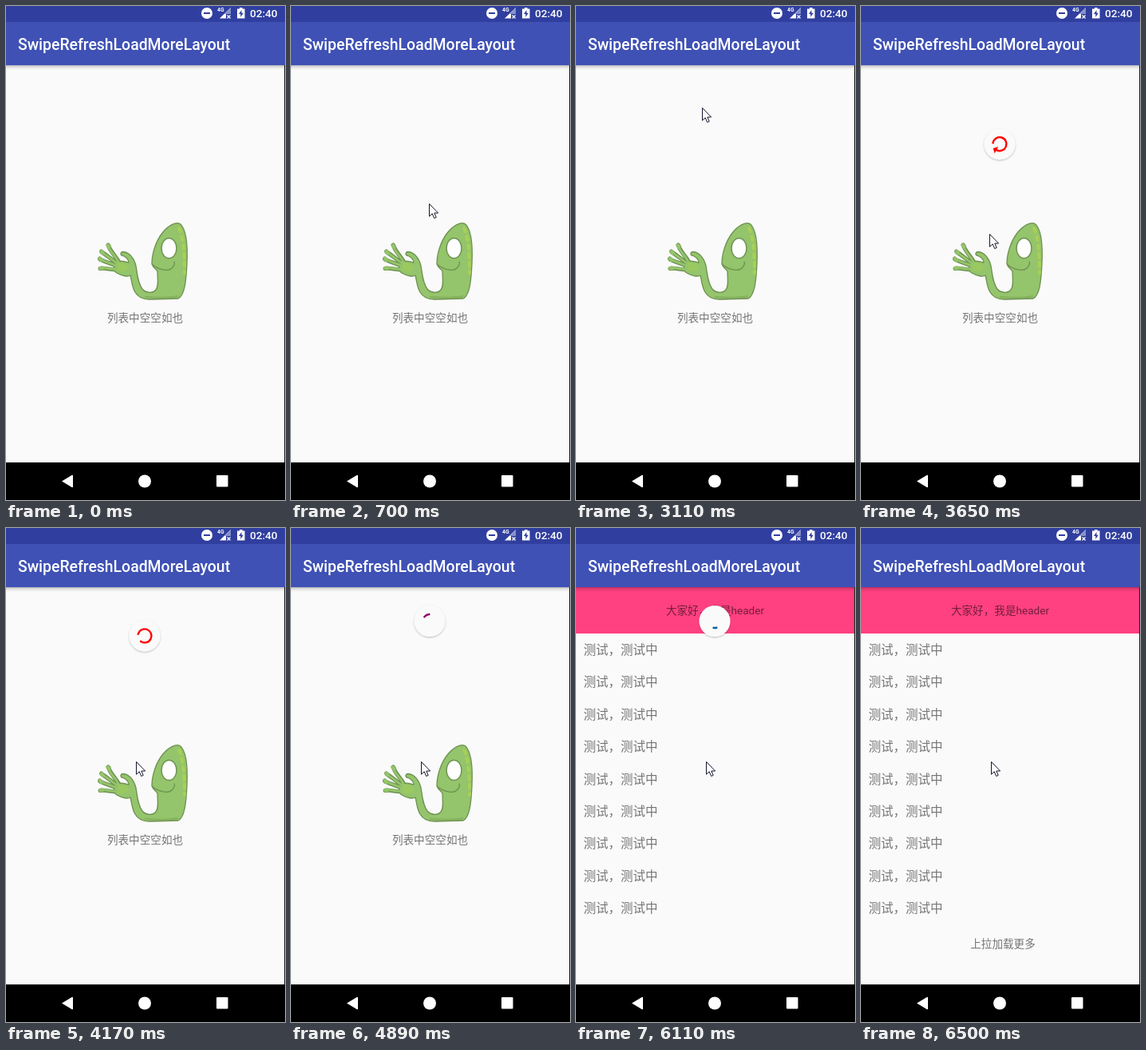
Recreate the animation shown at these times as an HTML page. Size 350 by 618 pixels, loop 8 s.

```html
<!DOCTYPE html>
<html lang="zh-CN">
<head>
<meta charset="utf-8">
<title>SwipeRefreshLoadMoreLayout</title>
<style>
  html, body { margin: 0; height: 100%; overflow: hidden; background: #fafafa; }
  svg { display: block; width: 350px; height: 618px; }
  text { font: 13.6px Roboto, 'Noto Sans CJK SC', 'Noto Sans CJK', sans-serif; fill: #757575; }
  .mid { text-anchor: middle; }
  .skin { fill: #94c46b; stroke: #6d9150; stroke-width: 1.3; stroke-linejoin: round; }
  .line { fill: none; stroke: #6d9150; stroke-width: 1.3; stroke-linecap: round; }
  .fingers { fill: none; stroke-linecap: round; }
</style>
</head>
<body>
<svg viewBox="0 0 350 618">
  <defs>
    <linearGradient id="fade" x2="0" y2="1">
      <stop stop-opacity=".28"/><stop offset=".4" stop-opacity=".1"/><stop offset="1" stop-opacity="0"/>
    </linearGradient>
    <filter id="soft" x="-30%" y="-30%" width="160%" height="160%">
      <feDropShadow dx="0" dy="1" stdDeviation="1.3" flood-opacity=".28"/>
    </filter>
    <g id="bones">
      <path d="M128.500 299.500C131 308 137 311 142 321M120.500 308C127 312 132 317 141 323M118 317C126 321 132 322 141 326M119 328C127 328 132 330 141 330"/>
      <path d="M128 299l1 1.500M119.500 307l1.500 1.500M117.500 316l1.500 1.500M118 328.500h2" stroke-width="5"/>
    </g>
  </defs>
  <rect width="350" height="618" fill="#fafafa"/>

  <g id="empty">
    <use href="#bones" class="fingers" stroke="#6d9150" stroke-width="5.200"/>
    <path class="skin" d="M216 366C224 362 226 345 227 322C228 300 226 280 219 273C213 269 203 275 196 284C188 294 183 310 183 322C184 328 188 328 190 332C190 342 192 350 188 355C184 360 175 359 171 354C165 346 165 336 163 325C161 316 155 308 147 307.500C143 308 143 312 147 312.500C151 314 154 318 154 321C150 320 144 318 139 320C135 324 134 331 139 334C146 338 153 339 156 337C158 345 158 352 162 358C166 365 172 367 180 367Z"/>
    <g transform="translate(130 318) scale(.955) translate(-130 -318)">
      <use href="#bones" class="fingers" stroke="#94c46b" stroke-width="3"/>
    </g>
    <path d="M141 321Q151 320 154 328Q148 334 140 331Z" fill="#9cc95f"/>
    <path class="line" d="M183 323C190 329 203 333 208 328C211 325 212 322 211 320"/>
    <ellipse cx="204.500" cy="303" rx="9.500" ry="12.500" fill="#fff" stroke="#6d9150" stroke-width="1.500"/>
    <path d="M217 278Q224 292 224 334" fill="none" stroke="#a9cf56" stroke-width="4" stroke-dasharray="5 6" stroke-linecap="round"/>
    <path d="M174 364Q200 366 216 363" fill="none" stroke="#84b05c" stroke-width="2"/>
    <text class="mid" x="174.500" y="394.500">列表中空空如也</text>
  </g>

  <g id="list">
    <rect y="74" width="350" height="58" fill="#ff4081"/>
    <text class="mid" x="174.500" y="108" style="fill:#000;fill-opacity:.54">大家好，我是header</text>
    <text class="mid" id="footer" x="178" y="524.500">上拉加载更多</text>
  </g>

  <g id="spinner">
    <circle r="19.500" fill="#fafafa" filter="url(#soft)"/>
    <g id="ring">
      <path id="arc" fill="none" stroke-width="2.400" stroke-linecap="square"/>
      <path id="arrow" d="M-4.850 0H4.850L0 4.850Z"/>
    </g>
  </g>

  <rect y="74" width="350" height="6" fill="url(#fade)"/>
  <rect width="350" height="74" fill="#3f51b5"/>
  <rect width="350" height="20" fill="#303f9f"/>
  <text x="15" y="54.500" style="font-size:19.400px;font-weight:500;fill:#fff">SwipeRefreshLoadMoreLayout</text>
  <g fill="#fff">
    <circle cx="252" cy="9" r="7"/>
    <path d="M248 8h8v2h-8Z" fill="#303f9f"/>
    <text x="265" y="7" style="font-size:6.800px;font-weight:700;fill:#fff">4G</text>
    <path d="M282 2V10H276V15.500H268Z"/>
    <path d="M282 2V10H274Z" fill="#8790c9"/>
    <path d="M277.500 11.500l4 4m0-4l-4 4" stroke="#fff" stroke-width="1.200"/>
    <path d="M290 3.500h3V2h3.500v1.500H299.500V15.500H290Z"/>
    <path d="M295.500 5l-3.500 5h2.300v4l3.500-5.200h-2.300Z" fill="#303f9f"/>
    <text x="306" y="14" style="font-weight:500;fill:#fff">02:40</text>
  </g>
  <rect y="571" width="350" height="47"/>
  <g fill="#fff">
    <path d="M70 594.500L82.500 587Q84 586 84 588V601Q84 603 82.500 602Z"/>
    <circle cx="174" cy="594.500" r="8"/>
    <rect x="264" y="587" width="14.500" height="14.500" rx="1"/>
  </g>
  <path d="M349.500 74V571" stroke="#222"/>
  <path id="cursor" d="M.5.500V16.200L4.200 12.800L6.700 18.500L9.200 17.400L6.800 12H11.600Z" fill="#fff" stroke="#15152e"/>
</svg>
<script>
const LOOP = 8000, PULL_START = 3260, RELEASE = 4120, SPIN = 4320, LOADED = 6110;
const TOP = 54.5, DRAG = 62, RADIUS = 8.5;
const COLORS = [[255, 0, 0], [0, 0, 255], [0, 255, 0]];

// time, x, y of the mouse pointer
const POINTER = [
  [430, 233, 489], [550, 204, 316], [700, 173, 247], [850, 170, 245], [1820, 170, 200],
  [1970, 179, 144], [2120, 174, 127], [2280, 170, 123], [2430, 167, 120], [2860, 160, 120],
  [3110, 158, 127], [3260, 159, 184], [3380, 160, 222], [3500, 160, 255], [3650, 161, 285],
  [3770, 162, 290], [3890, 163, 292]
];
// later moments at which the screen refreshes
const TICKS = [4170, 4320, 4470, 4590, 4740, 4890, 5020, 5170, 5290, 5450, 5600, 5720,
  5860, 5980, 6110, 6250, 6380, 6500];

const $ = id => document.getElementById(id);
const clamp = v => Math.max(0, Math.min(1, v));
const show = (id, on) => { $(id).style.display = on ? '' : 'none'; };
const place = (id, x, y, extra = '') => $(id).setAttribute('transform', `translate(${x} ${y}) ${extra}`);

// cubic-bezier(.4, 0, .2, 1)
function fastOutSlowIn(x) {
  let lo = 0, hi = 1, s;
  for (let i = 0; i < 24; i++) {
    s = (lo + hi) / 2;
    if (1.2 * s * (1 - s) ** 2 + 0.6 * s * s * (1 - s) + s ** 3 < x) lo = s; else hi = s;
  }
  return 3 * s * s * (1 - s) + s ** 3;
}

function mixColor(index, part) {
  const k = clamp((part - 0.75) / 0.25);
  return `rgb(${COLORS[index].map((c, i) => Math.round(c + (COLORS[index + 1][i] - c) * k))})`;
}

// Ring while the finger drags it down; angles in turns
function pulled(y) {
  const over = Math.max(0, y - 137), percent = clamp(over / DRAG);
  const u = Math.min(2, Math.max(0, over / DRAG - 1)) / 4;
  const tension = 2 * (u - u * u);
  const adjusted = Math.max(percent - 0.4, 0) * 5 / 3;
  return {
    y: TOP + DRAG * (percent + 2 * tension),
    start: 0, end: 0.8 * adjusted, arrow: adjusted,
    turn: (-0.25 + 0.4 * adjusted + 2 * tension) / 2,
    color: mixColor(0, 0)
  };
}

function ringAt(t, pointerY) {
  const ring = pulled(pointerY);
  if (t < RELEASE) return ring;
  const back = 1 - (1 - clamp((t - RELEASE) / (SPIN - RELEASE))) ** 4;
  ring.y += (TOP + DRAG - ring.y) * back;
  ring.arrow = 1 - back;
  if (t < SPIN) return ring;

  const closing = (t - SPIN) / 666;
  if (closing < 1) {
    ring.start = 0.79 * closing;
    ring.turn += (1 - ring.turn) * closing;
    ring.color = mixColor(0, closing);
    return ring;
  }
  const part = (closing - 1) / 2;
  const grow = 0.79 * fastOutSlowIn(clamp(part * 2));
  const shrink = 0.79 * fastOutSlowIn(clamp(part * 2 - 1));
  ring.start = 0.79 + shrink;
  ring.end = 0.8 + grow;
  ring.turn = part * (0.21 + 0.6);
  ring.color = mixColor(1, part);
  return ring;
}

function drawSpinner(t, pointerY) {
  const scale = 1 - clamp((t - LOADED - 30) / 150);
  const visible = t >= PULL_START && scale > 0;
  show('spinner', visible);
  if (!visible) return;
  const ring = ringAt(t, pointerY);
  const from = (ring.start + ring.turn) * 2 * Math.PI, to = (ring.end + ring.turn) * 2 * Math.PI;
  const point = a => `${RADIUS * Math.cos(a)} ${RADIUS * Math.sin(a)}`;
  place('spinner', 174, ring.y, `scale(${scale})`);
  $('ring').setAttribute('opacity', 0.3 + 0.7 * clamp((t - 3340) / 300));
  $('arc').setAttribute('d',
    `M${point(from)}A${RADIUS} ${RADIUS} 0 ${+(to - from > Math.PI)} 1 ${point(to)}`);
  $('arc').setAttribute('stroke', ring.color);
  $('arrow').setAttribute('fill', ring.color);
  $('arrow').setAttribute('transform',
    `rotate(${to * 180 / Math.PI}) translate(${RADIUS} 0) scale(${ring.arrow})`);
}

function draw() {
  const now = performance.now() % LOOP;
  const pointer = POINTER.filter(p => p[0] <= now).pop();
  const t = TICKS.filter(v => v <= now).pop() || (pointer ? pointer[0] : 0);
  show('cursor', pointer);
  if (pointer) place('cursor', pointer[1], pointer[2]);
  show('empty', t < LOADED);
  show('list', t >= LOADED);
  $('footer').setAttribute('opacity', clamp((t - 6200) / 200));
  drawSpinner(t, pointer ? pointer[2] : 0);
  requestAnimationFrame(draw);
}

for (let i = 0; i < 9; i++) {
  const row = document.createElementNS('http://www.w3.org/2000/svg', 'text');
  row.textContent = '测试，测试中';
  row.style.fontSize = '15.5px';
  row.setAttribute('x', 9.5);
  row.setAttribute('y', 158 + 40.4 * i);
  $('list').append(row);
}
draw();
</script>
</body>
</html>
```
